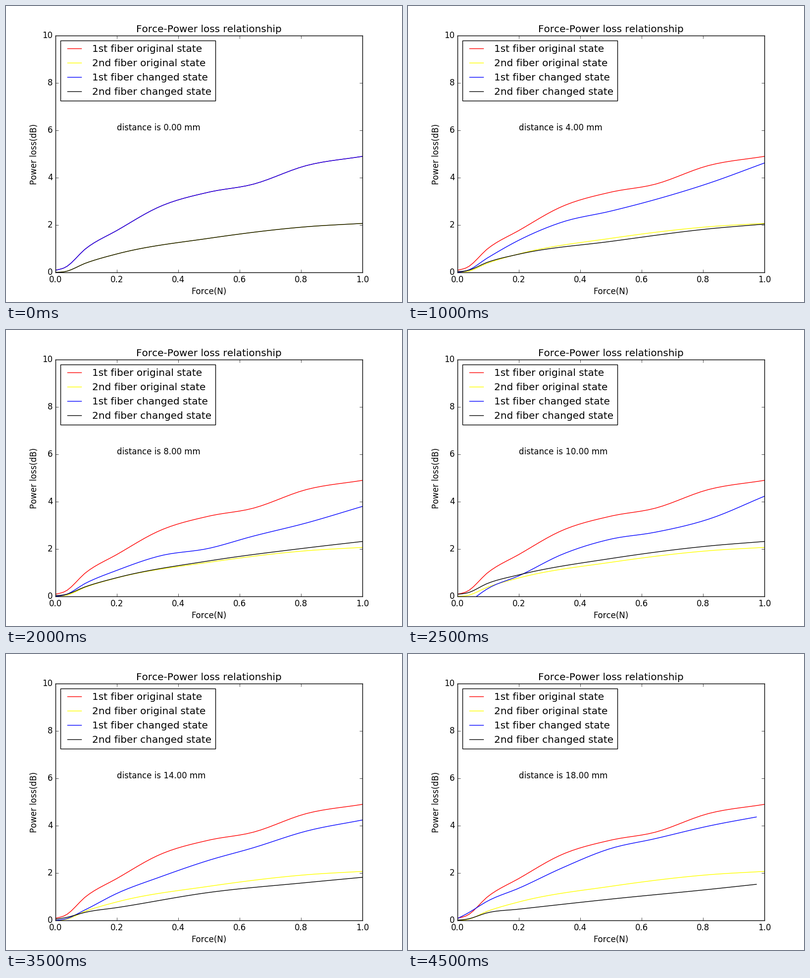
A matplotlib script for the animation above (5 s loop, 800 by 600 pixels).

```python
import numpy as np
import matplotlib.pyplot as plt
from matplotlib.animation import FuncAnimation

plt.style.use("classic")
plt.rcParams.update({"font.family": "DejaVu Sans", "figure.facecolor": "white",
                     "text.kerning_factor": 6})

STEP_MM, FRAMES, INTERVAL = 2, 10, 500

# Key losses (dB) at a few forces (N), by distance in mm
FORCE_1 = [0, .03, .1, .2, .34, .5, .64, .82, 1]
FIRST = {
    0: [.09, .2, 1.02, 1.77, 2.78, 3.39, 3.71, 4.52, 4.9],
    4: [0, .07, .63, 1.36, 2.12, 2.59, 3.06, 3.77, 4.62],
    8: [0, .06, .57, 1.1, 1.71, 2.03, 2.53, 3.11, 3.8],
    10: [-.55, -.3, .34, .87, 1.77, 2.42, 2.7, 3.27, 4.23],
    12: [.05, .14, .62, 1.25, 1.82, 2.45, 3.09, 3.78, 4.35],
    14: [0, .05, .47, 1.14, 1.83, 2.54, 3.05, 3.78, 4.24],
    18: [.08, .28, .83, 1.36, 2.21, 3.04, 3.44, 3.99, 4.43],
}
FORCE_2 = [0, .03, .1, .2, .5, .82, 1]
SECOND = {
    0: [0, .03, .4, .78, 1.44, 1.93, 2.07],
    4: [.03, .07, .44, .77, 1.31, 1.84, 2.04],
    8: [.03, .07, .42, .79, 1.5, 2.05, 2.32],
    10: [.09, .14, .56, .91, 1.6, 2.13, 2.32],
    12: [.05, .1, .55, .87, 1.53, 1.99, 2.18],
    14: [.05, .11, .35, .54, 1.18, 1.6, 1.82],
    18: [.01, .05, .33, .475, .9, 1.31, 1.56],
}


def smooth(kx, ky, x):
    """Cubic Hermite curve through the key points."""
    kx, ky = np.array(kx), np.array(ky)
    slope = np.gradient(ky, kx)
    i = np.clip(np.searchsorted(kx, x) - 1, 0, len(kx) - 2)
    h = kx[i + 1] - kx[i]
    t = (x - kx[i]) / h
    ease = t * t * (3 - 2 * t)
    return (ky[i] + (ky[i + 1] - ky[i]) * ease
            + h * t * (1 - t) * (slope[i] * (1 - t) - slope[i + 1] * t))


def curve(force, table, mm):
    """Loss curve at a distance, its keys blended between known distances."""
    keys = [np.interp(mm, list(table), col) for col in zip(*table.values())]
    end = np.interp(mm, [16, 18], [1, .974])
    x = end * np.linspace(0, 1, 50) ** 1.3
    return x, smooth(force, keys, x)


fig, ax = plt.subplots(figsize=(8, 6), dpi=100)
ax.plot(*curve(FORCE_1, FIRST, 0), color="red", label="1st fiber original state")
ax.plot(*curve(FORCE_2, SECOND, 0), color="yellow", label="2nd fiber original state")
line1, = ax.plot([], [], color="blue", label="1st fiber changed state")
line2, = ax.plot([], [], color="black", label="2nd fiber changed state")
note = ax.text(0.2, 6, "")
ax.set(xlim=(0, 1), ylim=(0, 10), xlabel="Force(N)", ylabel="Power loss(dB)",
       title="Force-Power loss relationship")
ax.legend(loc="upper left")


def update(i):
    mm = i * STEP_MM
    line1.set_data(*curve(FORCE_1, FIRST, mm))
    line2.set_data(*curve(FORCE_2, SECOND, mm))
    note.set_text(f"distance is {mm:.2f} mm")
    return line1, line2, note


anim = FuncAnimation(fig, update, frames=FRAMES, interval=INTERVAL,
                     repeat=True, repeat_delay=0)
plt.show()
```
